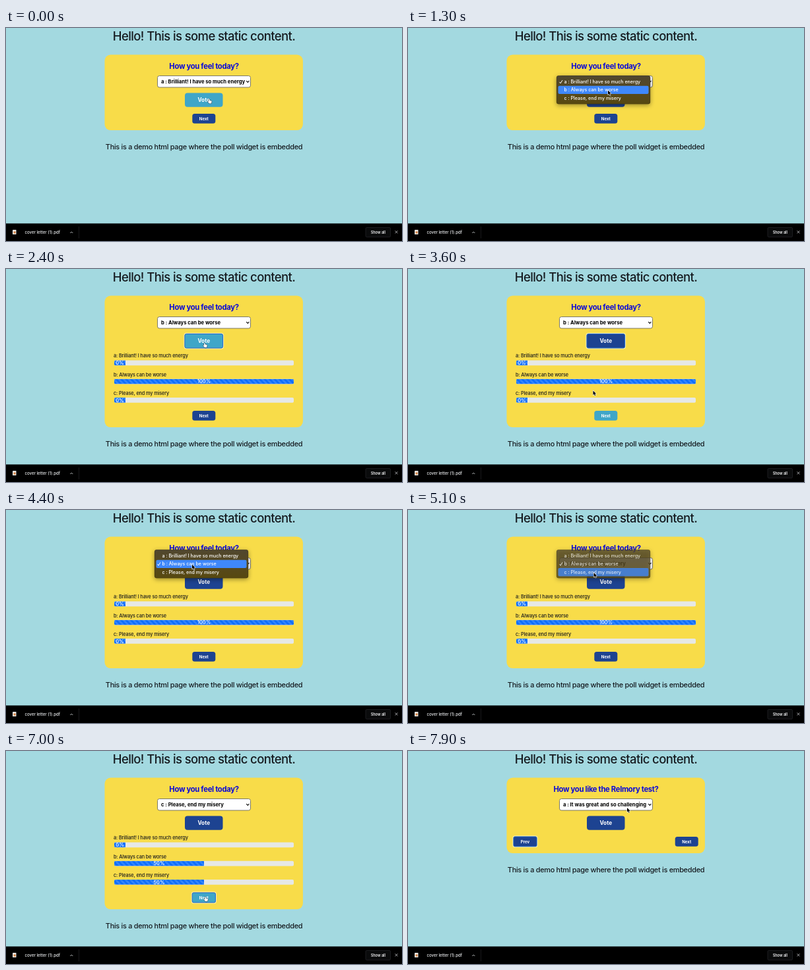
Recreate the animation shown at these times as an HTML page with a canvas. Size 600x323 px, loop 8000 ms.

```html
<!DOCTYPE html>
<html lang="en">
<head>
<meta charset="utf-8">
<title>Poll widget</title>
<style>
html, body { margin: 0; width: 100%; height: 100%; overflow: hidden; background: #a3d9e0; }
canvas { display: block; width: 600px; height: 323px; }
</style>
</head>
<body>
<canvas id="stage"></canvas>
<script>
const W = 600, H = 323, LOOP = 8000;
const canvas = document.getElementById('stage');
const ctx = canvas.getContext('2d');
const dpr = window.devicePixelRatio || 1;
canvas.width = W * dpr;
canvas.height = H * dpr;

const DARK = [29, 67, 145], LIGHT = [63, 166, 200];
const VOTED = 2050, REVOTED = 5870, NEXT = 7100;
const MOODS = ['Brilliant! I have so much energy', 'Always can be worse', 'Please, end my misery'];
const LETTERS = 'abc';

// time, x, y of the pointer tip
const PATH = [
  [0, 306.8, 107.6], [200, 306.8, 107.6], [600, 301, 82], [850, 302, 82],
  [1250, 303, 94.5], [1600, 303, 94.5], [1900, 299.8, 112], [2750, 299.8, 112],
  [3150, 298, 221], [3400, 297, 221], [3600, 280.5, 184.5], [4050, 282, 82],
  [4350, 282, 82], [4700, 281.5, 95], [5150, 281.5, 95], [5500, 299.8, 111],
  [6130, 300, 111], [6300, 307, 164], [6600, 301, 221], [7200, 301, 221],
  [7750, 332, 86], [8000, 332, 86]
];

const clamp = v => Math.max(0, Math.min(1, v));
const mix = (a, b, k) => a + (b - a) * k;
const during = (t, a, b, fade) => clamp(Math.min((t - a) / fade, 1 - (t - b) / fade));
const shown = (t, from, until, fade) => t < from ? 0 : clamp(1 - (t - until) / fade);
const tint = k => `rgb(${DARK.map((v, i) => Math.round(mix(v, LIGHT[i], k))).join()})`;

// cubic-bezier(.25, .1, .25, 1)
function ease(x) {
  let lo = 0, hi = 1;
  const bez = (p, q, s) => 3 * p * s * (1 - s) ** 2 + 3 * q * s * s * (1 - s) + s ** 3;
  for (let i = 0; i < 24; i++) {
    const mid = (lo + hi) / 2;
    if (bez(.25, .25, mid) < x) lo = mid; else hi = mid;
  }
  return bez(.1, 1, lo);
}

function box(x, y, w, h, r, fill, stroke, line = 1) {
  ctx.beginPath();
  ctx.roundRect(x, y, w, h, r);
  if (fill) { ctx.fillStyle = fill; ctx.fill(); }
  if (stroke) { ctx.strokeStyle = stroke; ctx.lineWidth = line; ctx.stroke(); }
}

function polyline(points, color, line) {
  ctx.beginPath();
  points.forEach(p => ctx.lineTo(...p));
  ctx.strokeStyle = color;
  ctx.lineWidth = line;
  ctx.stroke();
}

// y is the middle of the capitals
function text(str, x, y, size, { weight = 400, color = '#161b20', align = 'left', track = 0 } = {}) {
  ctx.font = `${weight} ${size}px Inter, "Open Sans", sans-serif`;
  ctx.letterSpacing = `${track * size}px`;
  ctx.textAlign = align;
  ctx.fillStyle = color;
  ctx.fillText(str, x, y + size * .364);
}

function button(label, x, y, w, h, r, size, hover, focus) {
  if (focus) box(x - 1.1, y - 1.1, w + 2.2, h + 2.2, r - 1, null, 'rgba(255,255,255,.7)', .9);
  box(x, y, w, h, focus ? r - 1.5 : r, tint(hover));
  if (focus) box(x - .1, y - .1, w + .2, h + .2, r - 1.5, null, '#1763d8', 1);
  text(label, x + w / 2, y + h / 2, size, { weight: 700, color: '#fff', align: 'center' });
}

function selectBox(label) {
  box(229.5, 72.5, 141, 17.5, 3, '#fff', '#6e6d60', .9);
  text(label, 235, 81.3, 7.65, { weight: 700, color: '#000' });
  polyline([[364.2, 80.2], [366.3, 82.4], [368.4, 80.2]], '#111', 1.2);
}

function bar(y, share, label, t) {
  const x = 164, w = 272, h = 7.7, step = 7.5, len = w * share;
  box(x, y, w, h, 2, '#e6e8e6');
  ctx.save();
  ctx.beginPath();
  ctx.roundRect(x, y, len, h, share > .99 ? 2 : [2, 0, 0, 2]);
  ctx.clip();
  ctx.fillStyle = '#0d6efd';
  ctx.fillRect(x, y, len, h);
  ctx.fillStyle = 'rgba(255,255,255,.15)';
  const shift = step * (1 - t / 1000 % 1);
  for (let sx = x - 3 * step + shift; sx < x + len; sx += step) {
    ctx.beginPath();
    ctx.moveTo(sx, y);
    ctx.lineTo(sx + step / 2, y);
    ctx.lineTo(sx + step / 2 + h, y + h);
    ctx.lineTo(sx + h, y + h);
    ctx.fill();
  }
  ctx.restore();
  text(label, x + len / 2, y + h / 2 + .1, 7.5, { weight: 500, color: '#fff', align: 'center' });
}

function results(t) {
  const k = ease(clamp((t - REVOTED) / 600));
  const half = t >= REVOTED;
  const shares = [.0625, mix(1, .5, k), mix(.0625, .5, k)];
  const labels = ['0%', half ? '50%' : '100%', half ? '50%' : '0%'];
  MOODS.forEach((mood, i) => {
    const y = 131.8 + i * 28.3;
    text(`${LETTERS[i]}: ${mood}`, 163, y, 7.35, { weight: 500, color: '#1b1c1c', track: -.02 });
    bar(y + 6.7, shares[i], labels[i], t);
  });
}

function menu(top, checked, active, alpha) {
  if (!alpha) return;
  ctx.save();
  ctx.globalAlpha = alpha;
  const shade = ctx.createLinearGradient(0, top, 0, top + 43);
  shade.addColorStop(0, '#50472f');
  shade.addColorStop(.5, '#57491f');
  shade.addColorStop(1, '#574810');
  ctx.shadowColor = 'rgba(0,0,0,.4)';
  ctx.shadowBlur = 7 * dpr;
  ctx.shadowOffsetY = 2 * dpr;
  box(225, top, 142, 43, 3, shade);
  ctx.shadowColor = 'transparent';
  box(225.2, top + .2, 141.6, 42.6, 3, null, 'rgba(40,35,15,.5)', .5);
  MOODS.forEach((mood, i) => {
    const y = top + 9.3 + i * 12.3;
    if (i === active) box(227.5, y - 6.1, 137, 12.3, 2, '#3f88fa');
    if (i === checked) polyline([[229.5, y + .3], [231, y + 2.3], [234, y - 2.5]], '#fff', 1);
    text(`${LETTERS[i]} : ${mood}`, 236.5, y, 7.08, { weight: 500, color: '#fff' });
  });
  ctx.restore();
}

function shelf() {
  ctx.fillStyle = '#000';
  ctx.fillRect(0, 296.4, W, H - 296.4);
  box(10, 306, 5.5, 7, .6, '#e9e4df');
  box(11.5, 308.5, 3, 3, 0, '#d9813f');
  text('cover letter (1).pdf', 28.5, 310, 6.1, { weight: 500, color: '#eef0f2' });
  polyline([[97.3, 311], [99.3, 309], [101.3, 311]], '#c9cccf', .9);
  ctx.fillStyle = '#1d1f21';
  ctx.fillRect(110, 301, .8, 18);
  box(545, 302.5, 37.5, 14.5, 1.5, '#0a0b0c', '#26282b', .7);
  text('Show all', 563.8, 309.6, 5.5, { weight: 600, color: '#f4f5f6', align: 'center' });
  polyline([[589.6, 307.5], [593.4, 311.3]], '#d8dadc', .8);
  polyline([[593.4, 307.5], [589.6, 311.3]], '#d8dadc', .8);
}

function pointerAt(t) {
  const i = Math.max(1, PATH.findIndex(p => p[0] > t));
  const a = PATH[i - 1], b = PATH[i];
  let k = clamp((t - a[0]) / (b[0] - a[0]));
  k = k * k * (3 - 2 * k);
  return [mix(a[1], b[1], k), mix(a[2], b[2], k)];
}

function pointer(x, y, hand) {
  ctx.save();
  ctx.translate(x, y);
  ctx.lineJoin = 'round';
  ctx.beginPath();
  if (hand) {
    ctx.scale(.85, .85);
    ctx.moveTo(.5, 4.6);
    ctx.lineTo(.2, .7);
    ctx.quadraticCurveTo(1, -.5, 1.7, .6);
    ctx.lineTo(2.2, 2.7);
    ctx.lineTo(4.6, 3.1);
    ctx.quadraticCurveTo(6, 3.4, 5.8, 5);
    ctx.lineTo(4.9, 8.2);
    ctx.lineTo(1.4, 8.2);
    ctx.lineTo(-1.4, 5);
    ctx.quadraticCurveTo(-1.3, 3.7, .5, 4.6);
  } else {
    [[0, 0], [0, 6.6], [1.5, 5.3], [2.6, 7.8], [3.7, 7.3], [2.6, 4.9], [4.6, 4.8]]
      .forEach(p => ctx.lineTo(...p));
  }
  ctx.closePath();
  ctx.strokeStyle = hand ? '#16202c' : '#fff';
  ctx.lineWidth = 1.1;
  ctx.stroke();
  ctx.fillStyle = hand ? '#fff' : '#000';
  ctx.fill();
  ctx.restore();
}

function draw(t) {
  ctx.setTransform(dpr, 0, 0, dpr, 0, 0);
  ctx.fillStyle = '#a3d9e0';
  ctx.fillRect(0, 0, W, H);

  const second = t >= NEXT;
  const open = t >= VOTED && !second;
  const drop = open ? 85 : 0;
  const center = { weight: 500, align: 'center' };

  text('Hello! This is some static content.', 300, 12, 18.5, { ...center, track: -.033 });
  box(149.5, 40.5, 300.4, 114.6 + drop, 9, '#f8dc49');
  text(second ? 'How you like the Relmory test?' : 'How you feel today?', 300, 58, 11.25,
    { weight: 700, color: '#0b09d8', align: 'center', track: -.028 });

  const choice = t < 1600 ? 0 : t < 4980 ? 1 : 2;
  selectBox(second ? 'a : It was great and so challenging' : `${LETTERS[choice]} : ${MOODS[choice]}`);

  const voteHover = Math.max(during(t, -500, 450, 120), during(t, 1820, 2880, 120), during(t, 5420, 6310, 120));
  const voteFocus = (t >= VOTED && t < 4150) || (t >= REVOTED && t < 7000);
  button('Vote', 271, 98.5, 57.5, 21.3, 4, 8.3, voteHover, voteFocus);

  if (open) results(t);
  const nextHover = Math.max(during(t, 3080, 3610, 120), during(t, 6520, 7120, 120));
  if (second) {
    button('Prev', 160, 130, 35, 14.7, 3.5, 6.1, nextHover, true);
    button('Next', 404.7, 130, 35, 14.7, 3.5, 6.1, 0, false);
  } else {
    button('Next', 282.3, 130 + drop, 35, 14.7, 3.5, 6.1, nextHover, t >= 7000);
  }

  text('This is a demo html page where the poll widget is embedded', 300, 180.5 + drop, 10.9,
    { ...center, track: -.026 });
  shelf();

  const [x, y] = pointerAt(t);
  const row = top => Math.max(0, Math.min(2, Math.floor((y - top - 3.2) / 12.3)));
  menu(72.3, 0, row(72.3), shown(t, 800, 1600, 180));
  menu(60.3, 1, row(60.3), shown(t, 4250, 5060, 200));

  const onVote = voteHover > 0 && y > 97 && y < 121;
  const onNext = nextHover > 0 && !second && y > 214;
  pointer(x, y, onVote || onNext);
}

const start = performance.now();
function tick() {
  draw((performance.now() - start) % LOOP);
  requestAnimationFrame(tick);
}
draw(0);
requestAnimationFrame(tick);
</script>
</body>
</html>
```
